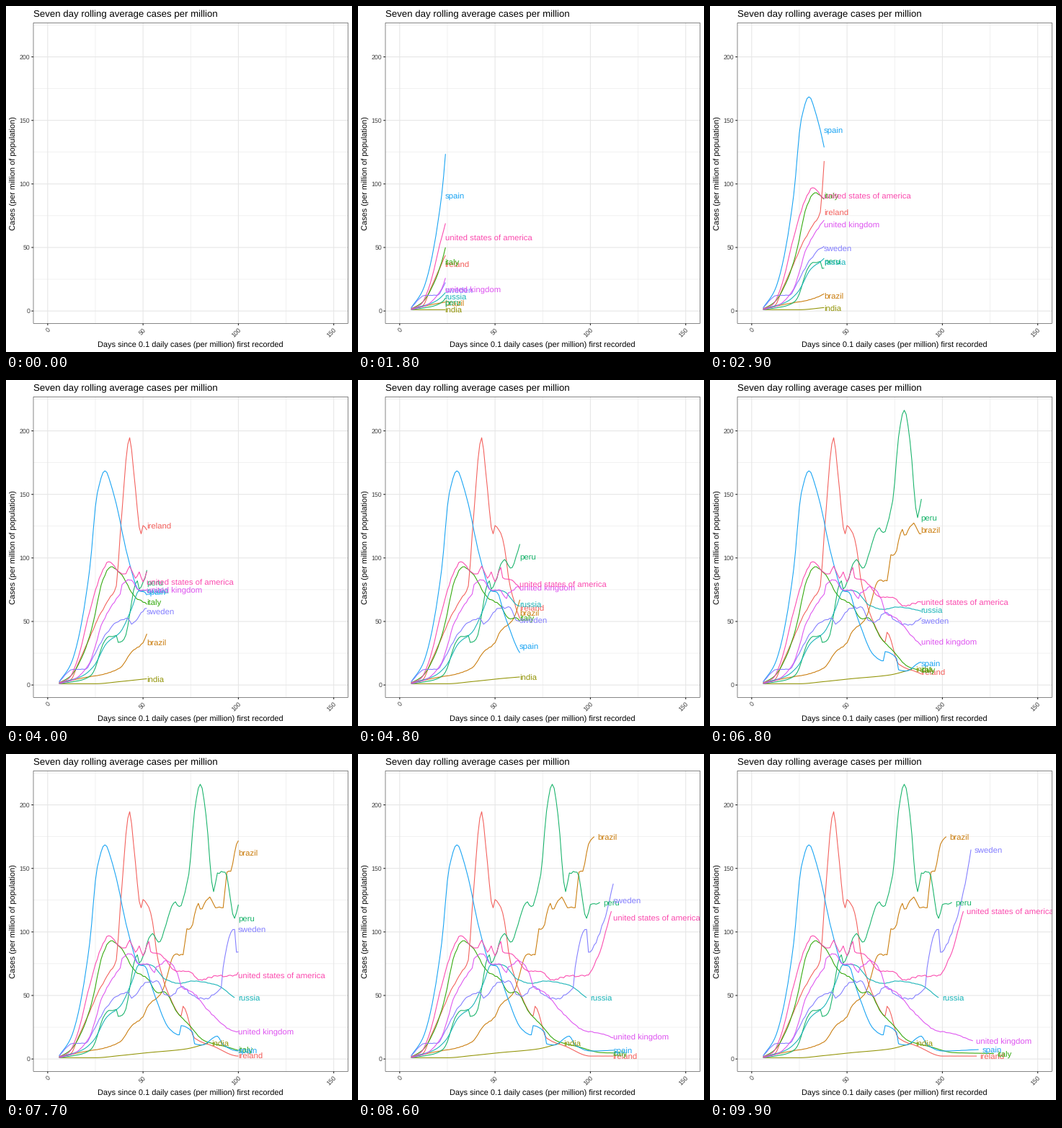
Write a matplotlib script that moves like this. It is 480 by 480 pixels and loops after 10000 ms.

```python
import matplotlib.pyplot as plt
import numpy as np
from matplotlib.animation import FuncAnimation
from matplotlib.patches import Rectangle

plt.rcParams.update({"font.family": "Liberation Sans", "text.hinting": "none",
                     "path.snap": False, "lines.solid_capstyle": "butt",
                     "lines.solid_joinstyle": "round"})

SIZE, DPI, FRAMES = 480, 100, 100
PT = 72 / DPI                                  # points per pixel
LEFT, RIGHT, TOP, BOTTOM = 38, 474.5, 23.4, 440.3
X_MIN, X_MAX, Y_MIN, Y_MAX = -7.5, 157.5, -9.75, 226.75
GRID, DARK, GREY = "#e6e6e6", "#262626", "#3f3f3f"
FIRST_DAY, LAG = 6, 2                          # labels trail the line tip


def px(day):
    return LEFT + (day - X_MIN) * (RIGHT - LEFT) / (X_MAX - X_MIN)


def py(cases):
    return BOTTOM - (cases - Y_MIN) * (BOTTOM - TOP) / (Y_MAX - Y_MIN)


fig = plt.figure(figsize=(SIZE / DPI, SIZE / DPI), dpi=DPI, facecolor="white")
ax = fig.add_axes([0, 0, 1, 1])
ax.set(xlim=(0, SIZE), ylim=(SIZE, 0))
ax.axis("off")
panel = Rectangle((LEFT, TOP), RIGHT - LEFT, BOTTOM - TOP, fc="none",
                  ec=DARK, lw=0.55 * PT, zorder=9)
ax.add_patch(panel)


def stroke(xs, ys, color, width=1.07, **kw):
    return ax.plot(xs, ys, color=color, lw=width * PT, **kw)[0]


def write(x, y, text, size, color="black", **kw):
    return ax.text(x, y, text, fontsize=size * PT, color=color,
                   va="baseline", rotation_mode="anchor", **kw)


def draw_frame():
    for day in range(25, 126, 50):
        stroke([px(day)] * 2, [TOP, BOTTOM], GRID, 0.53)
    for cases in range(25, 226, 50):
        stroke([LEFT, RIGHT], [py(cases)] * 2, GRID, 0.53)
    for day in range(0, 151, 50):
        x = px(day)
        stroke([x, x], [TOP, BOTTOM], GRID)
        stroke([x, x], [BOTTOM, BOTTOM + 2.75], DARK)
        write(x + 4.4, BOTTOM + 9.4, str(day), 8.8, GREY, ha="right", rotation=45)
    for cases in range(0, 201, 50):
        y = py(cases)
        stroke([LEFT, RIGHT], [y, y], GRID)
        stroke([LEFT - 2.75, LEFT], [y, y], DARK)
        write(LEFT - 4.95, y + 3.15, str(cases), 8.8, GREY, ha="right")
    write(LEFT - 0.3, 15, "Seven day rolling average cases per million", 13.2)
    write((LEFT + RIGHT) / 2, 473.4,
          "Days since 0.1 daily cases (per million) first recorded", 11, ha="center")
    write(13.4, (TOP + BOTTOM) / 2, "Cases (per million of population)", 11,
          ha="center", rotation=90)


def smooth(days, keys, values):
    """Monotone cubic curve through the key points."""
    h = np.diff(keys)
    d = np.diff(values) / h
    a, b = d[:-1], d[1:]
    inner = np.where(a * b > 0, 2 * a * b / np.where(a * b > 0, a + b, 1), 0)
    m = np.concatenate([d[:1], inner, d[-1:]])
    i = np.clip(np.searchsorted(keys, days, "right") - 1, 0, len(h) - 1)
    t = (days - keys[i]) / h[i]
    return (values[i] * (1 + 2 * t) * (1 - t) ** 2
            + values[i + 1] * t ** 2 * (3 - 2 * t)
            + h[i] * t * (1 - t) * (m[i] * (1 - t) - m[i + 1] * t))


class Country:
    """A daily curve through a few key points, with a travelling label."""

    rng = np.random.default_rng(4)

    def __init__(self, name, color, rough, *points):
        keys, values = np.array(points, float).T
        self.end = int(keys[-1])
        self.days = np.arange(FIRST_DAY, self.end + 1)
        cases = smooth(self.days, keys, values)
        jitter = rough * self.rng.uniform(-1, 1, len(cases)) * np.clip(cases / 60, 0, 1)
        self.cases = cases + np.where(np.isin(self.days, keys), 0, jitter)
        self.line = stroke([], [], color, zorder=5)
        self.label = write(0, 0, name, 11.38, color, zorder=6, clip_on=True)
        self.line.set_clip_path(panel)
        self.label.set_clip_path(panel)

    def show(self, tip):
        n = max(0, tip - FIRST_DAY + 1)
        self.line.set_data(px(self.days[:n]), py(self.cases[:n]))
        day = min(tip - LAG, self.end)
        self.label.set_visible(day >= FIRST_DAY)
        if day >= FIRST_DAY:
            self.label.set_position((px(day + LAG) - 0.6,
                                     py(self.cases[day - FIRST_DAY]) + 4.8))


draw_frame()
countries = [
    Country("ireland", "#f35e5a", 0.6,
            (6, 2), (12, 4), (16, 17), (22, 37), (26, 51), (31, 65), (36, 78),
            (38, 118), (43, 194.6), (45, 169.5), (49, 119), (50, 125.5), (54, 115),
            (58, 77), (64, 49), (70, 34), (71, 41.5), (77, 16.5), (87, 10), (100, 2.3),
            (118, 2.3)),
    Country("brazil", "#ca7c0c", 0.8,
            (6, 1.5), (20, 6), (28, 8), (38, 13.5), (44, 26), (50, 33.2), (52, 40.3),
            (60, 53), (67, 82.5), (71, 82), (73, 102.5), (75, 103), (79, 122.5),
            (80, 118), (85, 127.5), (88, 119), (92, 119), (94, 147), (96, 147.7),
            (99, 169), (102, 175)),
    Country("india", "#929406", 0,
            (6, 1), (25, 1), (38, 2.7), (52, 4.9), (72, 7.8), (84, 12.3)),
    Country("italy", "#31a80a", 0.5,
            (6, 1.5), (12, 7), (18, 22), (22, 38.5), (24, 50), (29, 83), (33, 93),
            (38, 88), (46, 69), (52, 63.5), (58, 52), (61, 53), (68, 36.5),
            (74, 27), (82, 14.5), (94, 9.5), (106, 5), (127, 4.3)),
    Country("peru", "#17b36a", 1,
            (6, 1), (18, 4), (23, 8), (31, 37), (36, 39), (37, 33.5), (40, 36),
            (47, 82), (48, 75.5), (55, 98.8), (58, 92), (67, 123.7), (69, 120),
            (74, 145.3), (77, 195), (80, 216.2), (83, 192), (87, 131.7), (89, 146.4),
            (93, 147), (98, 110.7), (100, 121.5), (105, 123.3)),
    Country("russia", "#17b3b7", 0.2,
            (6, 1.5), (18, 7), (24, 14.5), (31, 33), (38, 41.5), (44, 60), (48, 74.5),
            (54, 74), (62, 62.5), (69, 59.5), (76, 61.3), (88, 58.5), (98, 48.3)),
    Country("spain", "#15a2f3", 0.4,
            (6, 2.5), (12, 16), (16, 36), (22, 91), (26, 151), (30, 168.5), (35, 148),
            (42, 101), (48, 74), (51, 73), (55, 55), (64, 23.5), (69, 19), (70, 26.3),
            (76, 21), (77, 12), (81, 11), (89, 18), (92, 11), (100, 6.3), (119, 7.4)),
    Country("sweden", "#827dff", 1,
            (6, 2.5), (13, 12.2), (20, 12.5), (23, 19.5), (31, 41), (38, 51),
            (42, 52.5), (44, 47.8), (52, 60.3), (58, 61), (61, 51), (65, 49.7),
            (70, 57), (76, 50), (82, 47), (87, 50.5), (91, 56), (92, 72), (97, 101.8),
            (98, 102), (99, 84), (107, 108), (112, 138), (115, 164.8)),
    Country("united kingdom", "#de54f0", 1,
            (6, 1), (14, 4.5), (22, 17.4), (24, 26), (29, 50), (36, 68), (38, 71.5),
            (39, 79), (44, 82.5), (48, 75), (52, 75), (56, 68), (57, 72.6), (63, 77),
            (68, 67.6), (70, 57), (76, 52.5), (82, 42), (88, 32.5), (97, 22.2),
            (104, 20.5), (116, 14.3)),
    Country("united states of america", "#fb49ae", 0.8,
            (6, 1.5), (11, 5), (15, 17), (22, 57.6), (24, 69), (28, 87), (32, 97),
            (38, 88.5), (41, 87.5), (43, 93.5), (46, 84), (48, 89), (50, 81.2),
            (53, 92.5), (54, 84.5), (59, 82.5), (67, 69.5), (74, 69), (80, 62.5),
            (89, 65.2), (98, 66), (104, 80.5), (111, 116.3)),
]


def update(i):
    tip = round(0.3 + 1.3 * i)
    for country in countries:
        country.show(tip)


anim = FuncAnimation(fig, update, frames=FRAMES, interval=100,
                     repeat=True, repeat_delay=0, blit=False)
plt.show()
```
